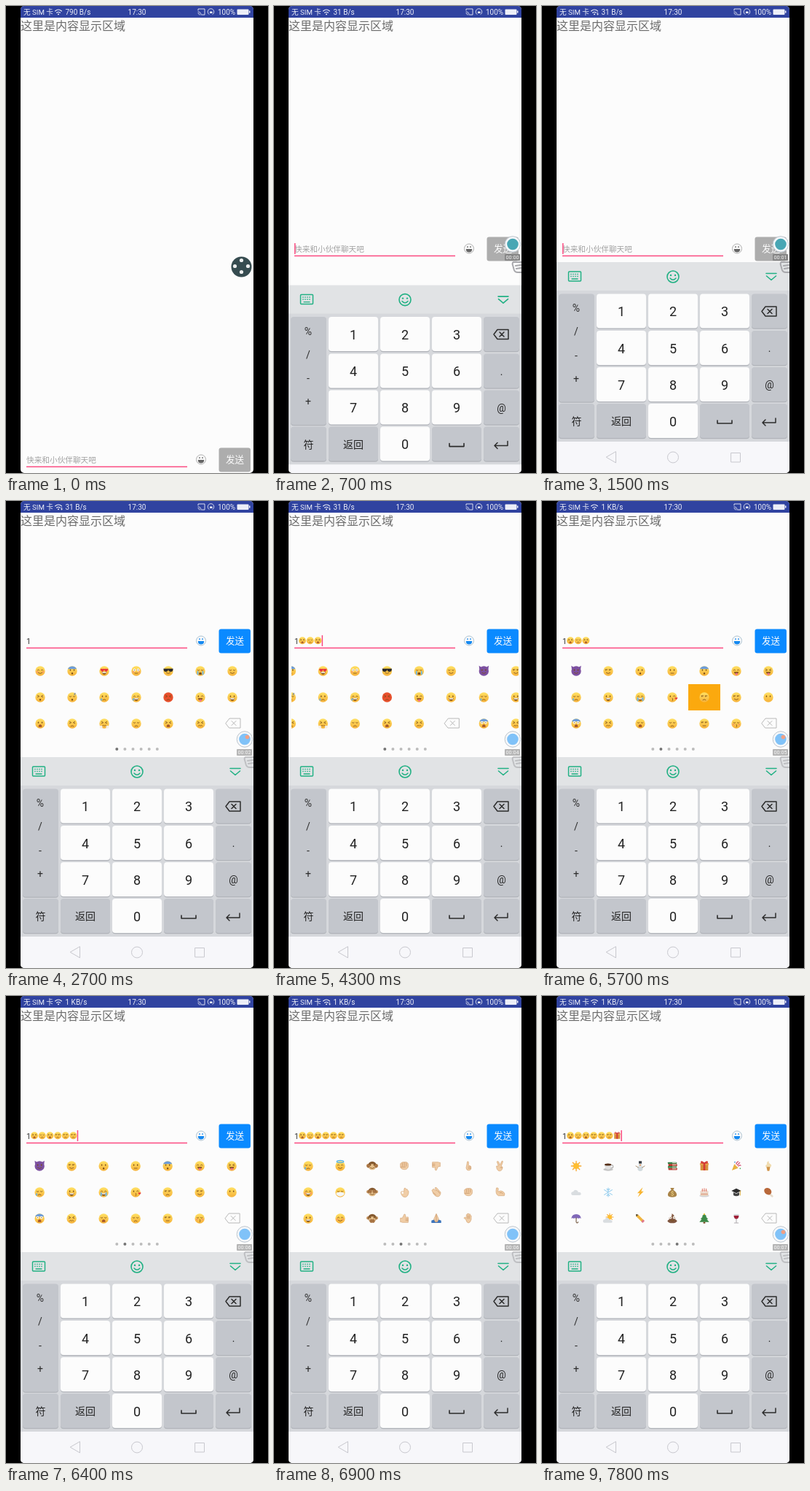
An HTML page that plays this animation: 360 by 640 pixels, repeating every 8000 ms.

```html
<!DOCTYPE html>
<html lang="zh-CN">
<head>
<meta charset="utf-8">
<title>Emoji keyboard</title>
<style>
html, body { margin: 0; width: 100%; height: 100%; overflow: hidden; background: #000; }
svg { display: block; width: 100%; height: 100%; }
text { font-family: Roboto, "Noto Sans CJK SC", "Noto Sans CJK", sans-serif; white-space: pre; }
.line { fill: none; stroke-linecap: round; stroke-linejoin: round; }
</style>
</head>
<body>
<svg id="stage" viewBox="0 0 360 640"></svg>
<script>
const LOOP = 8000, PITCH = 309;
const BROWN = '#7a4d18', SKIN = '#f0cda6', PAPER = '#fcfcfc', ACCENT = '#fb4a80';

const rect = (x, y, w, h, fill, r = 0) => `<rect x="${x}" y="${y}" width="${w}" height="${h}" rx="${r}" fill="${fill}"/>`;
const disc = (x, y, r, fill, extra = '') => `<circle cx="${x}" cy="${y}" r="${r}" fill="${fill}" ${extra}/>`;
const oval = (x, y, rx, ry, fill, extra = '') => `<ellipse cx="${x}" cy="${y}" rx="${rx}" ry="${ry}" fill="${fill}" ${extra}/>`;
const shape = (d, fill) => `<path d="${d}" fill="${fill}"/>`;
const line = (d, color, w = 1) => `<path class="line" d="${d}" stroke="${color}" stroke-width="${w}"/>`;
const text = (x, y, s, size, fill, anchor = 'start', extra = '') =>
  `<text x="${x}" y="${y}" font-size="${size}" fill="${fill}" text-anchor="${anchor}" ${extra}>${s}</text>`;
const group = (id, body) => `<g id="${id}">${body}</g>`;
const place = (x, y, scale, body) => `<g transform="translate(${x} ${y}) scale(${scale})">${body}</g>`;
const pair = draw => draw(-3.8) + draw(3.8);
const drop = (x, y) => shape(`M${x} ${y}q-3 5 0 6q3-1 0-6`, '#5cb2f2');

// Faces are three letters: eyes, mouth, extra. Radius is 10 units.
const eyes = {
  '.': pair(x => oval(x, -2, 1.2, 1.7, BROWN)),
  n: pair(x => line(`M${x - 2} -1.5q2-3 4 0`, BROWN, 1.2)),
  u: pair(x => line(`M${x - 2} -2q2 2.500 4 0`, BROWN, 1.2)),
  x: line('M-5.500-4l3.500 2l-3.500 1.500M5.500-4l-3.500 2l3.500 1.500', BROWN, 1.2),
  l: pair(x => line(`M${x - 2} -3h4`, BROWN, 1.2) + disc(x - 1, -1.8, 1, BROWN)),
  w: pair(x => disc(x, -2, 2.7, '#fff') + disc(x, -2, 1, BROWN)),
  k: oval(-4, -2, 1.2, 1.7, BROWN) + line('M2-2q2-3 4 0', BROWN, 1.2),
  h: pair(x => shape(`M${x} 2l-4-4q0-4 4-2q4-2 4 2z`, '#e8343c')),
  S: shape('M-10-5h20l-1 5q-4 3-8 0l-1-3l-1 3q-4 3-8 0z', '#2c2a2a')
};
const mouths = {
  s: line('M-4 3.500q4 3.500 8 0', BROWN, 1.2),
  g: shape('M-5 2h10q-1 5-5 5t-5-5', BROWN) + rect(-4, 2, 8, 2.2, '#fff'),
  f: line('M-3 5.500q3-3 6 0', BROWN, 1.2),
  l: line('M-3 4.500h6', BROWN, 1.2),
  w: line('M-4 5l2-1.500l2 1.500l2-1.500l2 1.500', BROWN, 1.1),
  o: oval(0, 5, 1.6, 2, BROWN),
  O: shape('M-3.500 7q0-5 3.500-5t3.500 5z', '#a4562a'),
  b: shape('M-2.500 7.500q-1-5 2.500-5t2.500 5z', BROWN),
  t: shape('M-4.500 2h9q0 4-4.500 4t-4.500-4', BROWN) + shape('M-2 4h4.500v3q-2 3-4.500 0z', '#f0708c'),
  k: line('M0 2q3 1 0 2.500q3 1 0 2.500', BROWN, 1.1),
  M: shape('M-8 1q8-3 16 0v4q-8 7-16 0z', '#f4f6f8')
};
const extras = {
  c: pair(x => disc(x * 1.6, 2, 2, '#f9a060')),
  t: rect(-6.5, 0, 2.5, 8, '#62baf4', 1) + rect(4, 0, 2.5, 8, '#62baf4', 1),
  d: drop(-6, 1),
  b: shape('M-9-4a10 10 0 0 1 18 0z', '#6c9cdc'),
  z: text(3, -4, 'z', 9, '#4064b0'),
  n: pair(x => disc(x * 1.7, 7, 3, '#f4f0e8')),
  h: shape('M8 5l-3-3q0-3 3-1q3-2 3 1z', '#e8343c'),
  H: oval(0, -9, 7, 2.2, 'none', 'stroke="#58b4e8" stroke-width="2"')
};
function face([eye, mouth, extra]) {
  const skin = { r: '#e8502c', p: '#7c50a0' }[extra] || 'url(#skin)';
  const horns = extra === 'p' ? shape('M-9-3l-1-8l6 4zM9-3l1-8l-6 4z', skin) : '';
  const decor = extras[extra] || '';
  const features = (eyes[eye] || '') + (mouths[mouth] || '');
  return horns + disc(0, 0, 10, skin) + (extra === 'b' ? decor + features : features + decor);
}

const hand = (d, folds = '') => `<path d="${d}" fill="${SKIN}" stroke="#d0a070" stroke-width=".9"/>` + line(folds, '#c08c5c', 1);
const monkey = cover => pair(x => disc(x * 2.2, -1, 3.4, '#c08e58')) + disc(0, -1, 8.5, '#855a30') +
  oval(0, 2, 7, 6, '#e6c08c') + eyes['.'] + mouths.s + cover;
const paw = (x, y) => oval(x, y, 3.4, 3.8, '#a87444');
const thumb = hand('M-8-1h4l4-8q4 0 2 6h6v11h-12l-2-1h-2z', 'M3 1h5M3 4h5');
const cloud = shape('M-7 6q-4-1-3-5q1-3 4-2q2-6 7-3q3 1 3 4q5-1 6 3q0 3-3 3z', '#d9dde0');
const sun = line('M0-10V10M-10 0H10M-7-7L7 7M7-7L-7 7', '#f7a830', 2) + disc(0, 0, 6, '#ffbe30');
const things = {
  ear: monkey(paw(-8, 0) + paw(8, 0)),
  eye: monkey(paw(-4, -2) + paw(4, -2)),
  mouth: monkey(paw(-2, 5) + paw(2, 5)),
  fist: hand('M-8-5q4-4 8-3q7-1 8 4v6q-2 6-9 5q-7-1-7-6z', 'M-4-6v6M0-7v7M4-6v6M-7 2h9'),
  down: `<g transform="rotate(180)">${thumb}</g>`,
  thumb,
  point: hand('M-2-9q2-1 2.500 1v7q5 0 5 3v4q-1 3-5 3q-4 0-5-5z', 'M0 2h5M0 5h5'),
  victory: hand('M-4 0l-3-9q2-2 4 1l2 6l4-8q3-1 2 2l-3 8q4 2 2 6q-2 5-7 4q-5-2-5-10z', 'M0 3h4'),
  okay: hand('M-7 1q0-3 3-3l3 1l1-7q2-2 3 1l1 1q2-2 3 2q2 0 2 4q-1 9-7 10q-7 0-9-9z') + disc(-3.5, 1, 2, PAPER),
  clap: hand('M-9-4l3-3l7 4l-4-6l3-1l9 10q0 8-6 9q-5 0-9-6z', 'M-6 1l5 4M3-3l4 5'),
  flex: hand('M-8-9q4-1 4 2l-1 6q6-4 11 0q5 4 2 8h-12q-7-3-4-16z', 'M-1 1q4-2 6 2'),
  pray: shape('M-10 9v-5l6-2h8l6 2v5z', '#3c74bc') + hand('M0-10l5 11l-3 6h-4l-3-6z', 'M0-8v14'),
  palm: hand('M-5 2l-4-3l2-2l3 2v-7h2v-2h3v1h3v3h2v8q-2 7-6 7q-4-1-5-7z', 'M-1-6v6M2-6v6'),
  sunny: sun,
  coffee: disc(7, 1, 3, 'none', 'stroke="#b4b4b4" stroke-width="2"') + oval(0, 7, 10, 3, '#c4c4c4') +
    shape('M-8-3h15q0 10-7 10t-8-10', '#e2e2e2') + oval(-.5, -3, 7, 2.4, '#563018'),
  snowman: disc(0, 5, 5.5, '#d2dade') + disc(0, -2, 4, '#dfe5e8') + rect(-3, -10, 6, 5, '#343a40') +
    line('M-9 0l5 3M9 0l-5 3', '#805a30') + disc(0, -2, 1.3, '#e87820'),
  books: ['#348048', '#b83428', '#3c8a50', '#b84038'].map((c, i) => rect(-9 + i % 2, -8 + i * 4, 18, 4.2, c, 1) + rect(0, -7 + i * 4, 8, 1.4, '#f0ecd8')).join(''),
  gift: rect(-8, -4, 16, 13, '#d8903c', 1) + rect(-9, -6, 18, 4, '#e8a850') + rect(-2, -6, 4, 15, '#d43c34') +
    line('M0-6q-8-6-6 0h12q2-6-6 0', '#d43c34', 2),
  party: shape('M-9 9l5-13l8 8z', '#e8b040') + line('M0-4q0-4 4-5M4 0q4-3 5-1M2-2l5-5', '#d04068', 1.8) +
    disc(-3, -8, 1.3, '#4898d8') + disc(8, 5, 1.3, '#48a860'),
  cone: shape('M-4 1h8l-2 9h-4z', '#d09448') + shape('M-5 2q-2-4 2-5q-1-6 4-7q-1 4 3 6q4 2 1 6z', '#f0dcb0'),
  cloud,
  flake: line('M0-9V9M-8-5L8 5M8-5L-8 5M-3-7l3 3l3-3M-3 7l3-3l3 3', '#94cdee', 1.6),
  bolt: shape('M5-10l-11 12h5l-4 8l12-12h-5z', '#f8b430'),
  money: shape('M-4-9h8l-2 4q8 5 7 11q-1 4-9 4t-9-4q-1-6 7-11z', '#a98448') + text(0, 6, '$', 11, '#ffe490', 'middle'),
  cake: oval(0, 7, 10, 2.6, '#d4d4d8') + rect(-8, -2, 16, 9, '#ecd8bc', 2) + oval(0, -1, 8, 2.6, '#f6ece4', 'stroke="#dcb8a8"') +
    line('M-4-2v-5M0-2v-6M4-2v-5', '#e0705c', 1.5) + line('M-7 4h14', '#d88478', 1.2),
  cap: shape('M-10-3l10-5l10 5l-10 5z', '#2c2c2c') + shape('M-6 0l6 3l6-3v6q-6 4-12 0z', '#444') + line('M8-3v9', '#d0a030', 1.4),
  meat: line('M2 3l6 5', '#e8dccc', 4) + oval(-2, -1, 8, 6.5, '#b8683a', 'transform="rotate(35)"'),
  umbrella: shape('M-10 0q1-9 10-9t10 9q-3-2-5 0q-3-2-5 0q-2-2-5 0q-2-2-5 0', '#8068b8') + line('M0-1v8q2 4 4 0', '#70543c', 1.6),
  fair: place(3, -3, .75, sun) + place(-1, 3, .95, cloud),
  pencil: shape('M-9-9l5 1l12 12l-4 4l-12-12z', '#f0b640') + shape('M-9-9l5 1l-4 4z', '#4c4438') + shape('M6 2l3 3l-4 4l-3-3z', '#e0788c'),
  swirl: shape('M-5-2q5-2 4-8q5 2 6 8z', '#8a6048') + oval(0, -1, 6.5, 4, '#8a6048') + oval(0, 5, 9.5, 4.5, '#805640') + eyes.w + mouths.s,
  tree: shape('M0-10l5 6h-2l5 5h-3l5 6h-20l5-6h-3l5-5h-2z', '#3c8a48') + rect(-2, 7, 4, 3, '#7a4c24') + disc(0, -9, 1.6, '#f8c430'),
  wine: shape('M-5-9h10q2 9-5 10q-7-1-5-10', '#d4d4d8') + shape('M-5-6h10q0 6-5 7q-5-1-5-7', '#a02038') + line('M0 1v7M-4 9h8', '#b0acb0', 1.6)
};
const pages = [
  'nsc .ob hg- wlc Ss- ubt us- xo- uoz .fd ngd xfr kt- .g- .O- xf- xwn uf- xO- xw-',
  '.sp ls- .o- .l- .ob nt- xt- ufd .g- ngt kkh lf- ls- .-- wOb xw- uO- uf- ll- ukc',
  'ufd nsH ear fist down point victory ngc uM- eye okay clap fist flex .g- nsc mouth thumb pray palm',
  'sunny coffee snowman books gift party cone cloud flake bolt money cake cap meat umbrella fair pencil swirl tree wine'
].map(row => row.split(' '));
const emoji = code => things[code] || face(code);

const cellX = i => 47 + 44 * (i % 7), cellY = i => 233 + 36 * Math.floor(i / 7);
const erase = (x, y, color, w) => line(`M${x - 10} ${y}l5-6.5h15v13h-15zM${x - 2} ${y - 3}l6 6m0-6l-6 6`, color, w);

// Touches on the emoji grid: pressed, released, page, cell.
const taps = [
  [3280, 3400, 0, 18], [3480, 3600, 0, 17], [3740, 3850, 0, 18],
  [5600, 5800, 1, 11], [5920, 6040, 1, 11], [6180, 6300, 1, 11], [7560, 7700, 3, 4]
];
const typedAt = 1900, panelAt = 2500, focusAt = 700;
const cursorResets = [focusAt, 1450, typedAt, ...taps.map(tap => tap[1])];
const swipe = [[4100, 0], [4300, 67], [4450, 165], [4600, 265], [4800, PITCH],
  [6400, PITCH], [6530, PITCH + 110], [6780, PITCH * 2],
  [6980, PITCH * 2], [7120, PITCH * 2 + 120], [7380, PITCH * 3]];

function along(steps, t) {
  if (t <= steps[0][0]) return steps[0][1];
  const i = steps.findIndex(step => step[0] >= t);
  if (i < 0) return steps[steps.length - 1][1];
  const [t0, v0] = steps[i - 1], [t1, v1] = steps[i];
  return v0 + (v1 - v0) * (t - t0) / (t1 - t0);
}

function statusBar() {
  const c = '#eceef8';
  return rect(20, 0, 320, 16, '#3043a0') + text(24, 12, '无 SIM 卡', 9.7, c) +
    line('M67.500 7q4.500-4 9 0M69.500 9.200q2.500-2 5 0', c, 1.1) + disc(72, 11.2, 1, c) +
    group('traffic', line('M76.500 9v3m-1-1l1 1l1-1', c, .9)) +
    text(81.5, 12, '', 10, c, 'start', 'id="speed"') + text(180, 12, '17:30', 10, c, 'middle') +
    line('M264 6v-2h9v8h-4M264 8q4 0 4 4M264 10q2 0 2 2', c, .9) +
    line('M279 11.500a4.300 4.300 0 1 1 5 0', c, .9) + rect(280, 7.5, 3.5, 2.5, c) +
    text(291, 12, '100%', 10, c) + rect(317.5, 4.5, 16, 7.5, c, 1) + rect(334, 6.5, 1.5, 3, c);
}

function inputRow() {
  const icon = (mouth, ring, ink) => disc(268, 0, 6.5, '#fafafa', `stroke="${ring}" stroke-width=".9"`) +
    shape('M263.800 .5h8.400q0 4.500-4.200 4.500t-4.200-4.500', mouth) + disc(266, -2.3, .9, ink) + disc(270, -2.3, .9, ink);
  return group('row',
    text(28, 4, '快来和小伙伴聊天吧', 10.67, '#a2a2a2', 'start', 'id="hint"') +
    group('typed', text(28, 4, '1', 10.67, '#303030') +
      taps.map(([, , p, c], i) => group('sent' + i, place(39 + 10.7 * i, -.3, .5, emoji(pages[p][c])))).join('')) +
    `<rect id="cursor" y="-7.5" width="1.5" height="15" fill="${ACCENT}"/>` + rect(28, 9.2, 221, 1.5, ACCENT) +
    group('plain', icon('#666', '#a8a8a8', '#666')) + group('active', icon('#1689f0', '#a4bccc', '#1689f0')) +
    '<rect id="button" x="292.500" y="-16" width="43.500" height="33" rx="3"/>' +
    text(314.5, 4.6, '发送', 12.6, '#fcfcfc', 'middle'));
}

function emojiPanel() {
  const cells = pages.map((codes, p) => place(p * PITCH, 0, 1,
    codes.map((code, i) => place(cellX(i), cellY(i), .67, emoji(code))).join('') + erase(312, 304.5, '#b8b8b8', 1))).join('');
  const dots = [0, 1, 2, 3, 4, 5].map(i => disc(152.3 + 11.1 * i, 340, 2, '', 'class="dot"')).join('');
  return group('panel', `<g clip-path="url(#view)"><g id="pages"><rect id="press" width="44" height="36" fill="#fba90e"/>${cells}</g></g>` + dots);
}

function keyboard() {
  const cols = [[23, 49], [75, 68], [146, 68], [217, 68], [288, 49]], rows = [394.5, 445, 495, 545];
  const key = (c, r, fill, label = '', size = 18, h = 47, id = '') => {
    const [x, w] = cols[c], y = rows[r];
    return rect(x, y + 1.2, w, h, '#b0b3b9', 4) + group(id, rect(x, y, w, h, fill, 4)) +
      text(x + w / 2, y + 24 + size * .37, label, size, '#222', 'middle');
  };
  const grey = '#c3c6cc', white = '#fcfcfc', green = '#22b184', ink = '#2c2c2c', nav = '#c8c8ce';
  let out = rect(20, 351, 320, 40, '#e1e3e5') + rect(20, 390, 320, 207, '#d6d8dc') + rect(20, 597, 320, 43, '#f7f7fa');
  out += `<rect x="36.500" y="364" width="17" height="13" rx="1" fill="none" stroke="${green}" stroke-width="1.500"/>` +
    [367.5, 370.5].map(y => [39, 42, 45, 48].map(x => rect(x + .2, y - .7, 1.5, 1.4, green)).join('')).join('') +
    line('M41 374h8', green, 1.3) +
    disc(180, 371, 8, 'none', `stroke="${green}" stroke-width="1.600"`) + disc(177, 369, 1.2, green) + disc(183, 369, 1.2, green) +
    line('M176 373q4 4.500 8 0', green, 1.5) + line('M308 366.500h14M308.500 370l6.500 5.500l6.500-5.500', green, 1.6);
  out += key(0, 0, grey, '', 1, 148) + ['%', '/', '-', '+'].map((s, i) => text(47, 419 + i * 32.3, s, 14, ink, 'middle')).join('');
  for (let n = 1; n <= 9; n++) out += key((n - 1) % 3 + 1, Math.floor((n - 1) / 3), white, n, 18, 47, 'key' + n);
  out += key(4, 0, grey) + erase(312, 418.5, ink, 1.5) + key(4, 1, grey, '.', 14) + key(4, 2, grey, '@', 14) +
    key(0, 3, grey, '符', 14) + key(1, 3, grey, '返回', 14) + key(2, 3, white, '0') + key(3, 3, grey) + key(4, 3, grey) +
    line('M241 568v4h20v-4', ink, 1.6) + line('M321 565v6h-18m4-4l-4 4l4 4', ink, 1.5);
  out += line('M101.500 611v15l-13-7.500z', nav) + disc(180, 618.5, 7.5, 'none', `stroke="${nav}"`) + line('M260 612.500h12.500v12.500h-12.500z', nav);
  return group('keyboard', out);
}

function floating() {
  const menu = disc(323.5, 357.5, 14, '#364c50') + [[0, -9], [-9, -1], [9, -1], [0, 7]]
    .map(([x, y]) => disc(323.5 + x, 357.5 + y, 2.6, '#eceeee')).join('');
  const recorder = disc(328, 326.5, 10.8, '#f6f8fa', 'stroke="#bcc4cc"') + '<circle id="lens" cx="328" cy="326.500" r="7.800"/>' +
    group('spark', disc(331.5, 323.5, 2.8, '#f0a084')) +
    group('tag', rect(317, 340, 21, 9, '#868686', 1) + text(327.5, 347.2, '', 7.3, '#f6f6f6', 'middle', 'id="clock"') +
      line('M340 351h-11q-2 1-1 4l2 7q1 3 5 3h5M332 356l7-1M333 360l6-1', '#a8a8ac', 2));
  return group('menu', menu) + group('recorder', recorder);
}

document.getElementById('stage').innerHTML = `<defs>
  <linearGradient id="skin" x2="0" y2="1"><stop stop-color="#ffe062"/><stop offset="1" stop-color="#f6b23a"/></linearGradient>
  <clipPath id="view"><rect x="24" y="213" width="312" height="113"/></clipPath>
  <clipPath id="screen"><rect x="20" width="320" height="640" rx="5"/></clipPath></defs>
  <g clip-path="url(#screen)">` + rect(20, 0, 320, 640, PAPER) + statusBar() +
  text(20, 33.3, '这里是内容显示区域', 16, '#6c6c6c') + emojiPanel() + inputRow() + keyboard() + floating() + '</g>';

const $ = id => document.getElementById(id);
const show = (id, on) => $(id).setAttribute('visibility', on ? 'inherit' : 'hidden');
const set = (id, name, value) => $(id).setAttribute(name, value);
const dots = [...document.querySelectorAll('.dot')];

function draw(t) {
  const typed = t >= typedAt, open = t >= panelAt, recording = t >= 250;
  const sent = taps.filter(tap => t >= tap[1]).length;

  $('speed').textContent = t < 700 ? '790 B/s' : t < 5000 ? '31 B/s' : '1 KB/s';
  show('traffic', t >= 1200 && t < 5000 || t >= 6800 && t < 7600);

  set('row', 'transform', `translate(0 ${t < focusAt ? 621.5 : open ? 191.5 : 332.5})`);
  show('hint', !typed);
  show('typed', typed);
  taps.forEach((_, i) => show('sent' + i, typed && i < sent));
  show('plain', !open);
  show('active', open);
  set('button', 'fill', typed ? '#0a8aff' : '#adadad');
  const reset = cursorResets.filter(r => r <= t).pop();
  show('cursor', reset !== undefined && (t - reset) % 1000 < 500);
  set('cursor', 'x', typed ? 33.5 + 10.7 * sent : 28);

  const lift = Math.min(1, Math.max(0, (t - 500) / 300));
  set('keyboard', 'transform', `translate(0 ${290 * (1 - lift) ** 2})`);
  set('key1', 'opacity', t >= 1800 && t < 1950 ? .6 : 1);

  show('panel', open);
  const offset = along(swipe, t);
  set('pages', 'transform', `translate(${-offset} 0)`);
  dots.forEach((dot, i) => dot.setAttribute('fill', i === Math.round(offset / PITCH) ? '#757575' : '#bcbcbc'));
  const held = taps.find(([down, up]) => t >= down && t < up);
  show('press', open && held);
  if (held) {
    set('press', 'x', held[2] * PITCH + cellX(held[3]) - 22);
    set('press', 'y', cellY(held[3]) - 18);
  }

  show('menu', !recording);
  set('menu', 'opacity', t < 100 ? 1 : Math.max(0, 1 - (t - 100) / 150));
  show('recorder', recording);
  set('tag', 'opacity', t < 2000 ? 1 : .6);
  set('lens', 'fill', t < 2000 ? '#48a6b4' : '#80c2f8');
  show('spark', recording && t >= 2000 && t % 1000 >= 500 && t % 1000 < 850);
  $('clock').textContent = '00:0' + Math.floor(t / 1000);
}

const start = performance.now();
function tick() {
  draw((performance.now() - start) % LOOP);
  requestAnimationFrame(tick);
}
tick();
</script>
</body>
</html>
```
